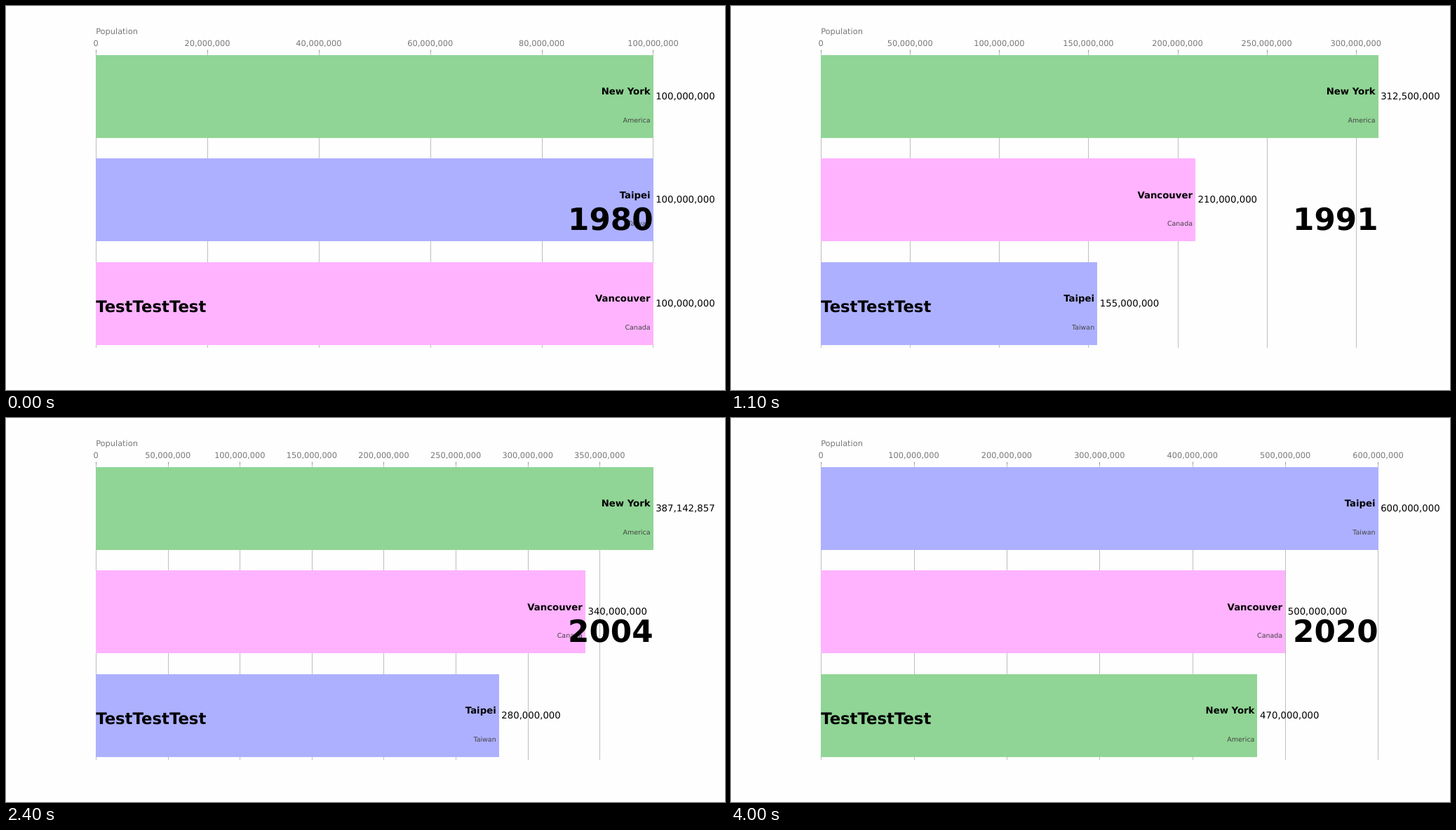
An HTML page with a canvas for the animation above (4.1 s loop, 1025 px wide and 547 px high).

```html
<!DOCTYPE html>
<html lang="en">
<head>
<meta charset="utf-8">
<title>Population bar chart race</title>
<style>
  html, body { margin: 0; width: 100%; height: 100%; overflow: hidden; background: #fefefe; }
  canvas { display: block; }
</style>
</head>
<body>
<canvas id="stage" width="1025" height="547"></canvas>
<script>
const ctx = document.getElementById('stage').getContext('2d');

const STEP = 100, FIRST_YEAR = 1980, YEARS = 41;
const AXES = { left: 128.125, right: 922.5, top: 65.64, bottom: 486.83 };
const WIDTH = AXES.right - AXES.left;
const ROW = (AXES.bottom - AXES.top) / 2.856;
const PT = 1025 / 15 / 72;
const GAP = WIDTH / 200;

// Values in millions at the years where the growth rate changes.
const cities = [
  { name: 'New York', group: 'America', color: '#90d595',
    keys: [[1980, 100], [1990, 300], [1992, 325], [2020, 470]] },
  { name: 'Taipei', group: 'Taiwan', color: '#adb0ff',
    keys: [[1980, 100], [2000, 200], [2020, 600]] },
  { name: 'Vancouver', group: 'Canada', color: '#ffb3ff',
    keys: [[1980, 100], [2020, 500]] }
];

function valueAt(keys, year) {
  const i = Math.max(1, keys.findIndex(k => k[0] >= year));
  const [y0, v0] = keys[i - 1], [y1, v1] = keys[i];
  return v0 + (v1 - v0) * (year - y0) / (y1 - y0);
}

function tickStep(max) {
  const raw = max / 9, unit = 10 ** Math.floor(Math.log10(raw));
  return unit * [1, 2, 2.5, 5, 10].find(s => s * unit >= raw - 1e-9);
}

const format = millions => Math.round(millions * 1e6).toLocaleString('en-US');

function text(str, x, y, size, { align = 'left', color = '#000', bold = false } = {}) {
  ctx.font = `${bold ? 'bold ' : ''}${size * PT}px "DejaVu Sans", sans-serif`;
  ctx.textRendering = 'geometricPrecision';
  ctx.textAlign = align;
  ctx.fillStyle = color;
  ctx.fillText(str, x, Math.round(y));
}

function rect(x0, y0, x1, y1, color) {
  ctx.fillStyle = color;
  ctx.fillRect(x0, y0, x1 - x0, y1 - y0);
}

function draw(year) {
  const rows = cities
    .map(c => ({ ...c, value: valueAt(c.keys, year) }))
    .sort((a, b) => b.value - a.value);
  const max = rows[0].value, step = tickStep(max);
  const xOf = v => AXES.left + WIDTH * v / max;

  rect(0, 0, 1025, 547, '#fefefe');

  for (let v = 0; v <= max + 1e-6; v += step) {
    const x = xOf(v), col = Math.floor(x + 0.49);
    rect(col, 66, col + 1, 487, '#bebebe');
    rect(col, 62.5, col + 1, 66, '#989898');
    text(format(v), x, 57, 12, { align: 'center', color: '#777' });
  }

  rows.forEach((r, i) => {
    r.mid = AXES.top + ROW * (0.428 + i);
    r.x = xOf(r.value);
    rect(128, Math.round(r.mid - 0.4 * ROW), Math.round(r.x), Math.round(r.mid + 0.4 * ROW), r.color);
  });

  for (const r of rows) {
    text(r.name, r.x - GAP, r.mid - 2.7, 14, { align: 'right', bold: true });
    text(r.group, r.x - GAP, r.mid + ROW / 4, 10, { align: 'right', color: '#444' });
    text(format(r.value), r.x + GAP - 0.3, r.mid + 4, 14);
  }

  text(year, AXES.right, 319, 46, { align: 'right', bold: true });
  text('Population', AXES.left, 40, 12, { color: '#777' });
  text('TestTestTest', AXES.left, 436, 24, { bold: true });
}

let shown;
function tick() {
  const year = FIRST_YEAR + Math.floor(performance.now() / STEP) % YEARS;
  if (year !== shown) draw(shown = year);
  requestAnimationFrame(tick);
}
tick();
</script>
</body>
</html>
```
